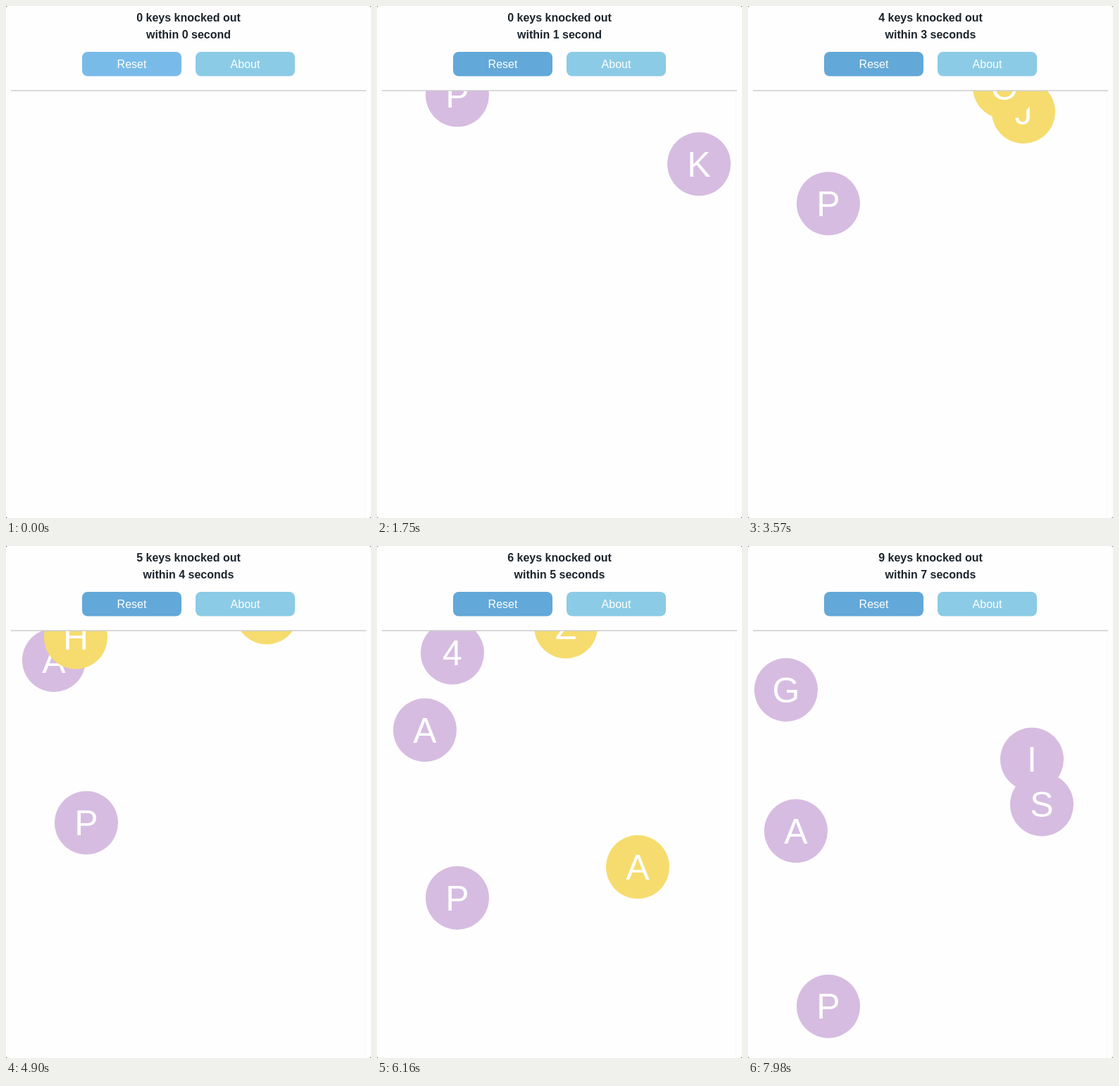
An HTML page that plays this animation: 518 by 726 pixels, repeating every 8 s.

```html
<!DOCTYPE html>
<html lang="en">
<head>
<meta charset="utf-8">
<title>Falling keys</title>
<style>
  html, body { margin: 0; width: 100%; height: 100%; overflow: hidden; background: #777; }
  svg { display: block; width: 518px; height: 726px; font: 16px "Liberation Sans", Arial, sans-serif; text-anchor: middle; }
  .score { font-weight: bold; fill: #1b242c; }
  .white, .ball text { fill: #fff; }
  .ball text { font-size: 50px; }
</style>
</head>
<body>
<svg viewBox="0 0 518 726">
  <defs><clipPath id="field"><rect y="120" width="518" height="606"/></clipPath></defs>
  <rect width="518" height="726" rx="3" fill="#fefefe"/>
  <path d="M509.5 128V726" stroke="#f8f8f8"/>
  <text class="score" id="keys" x="259" y="21.5"></text>
  <text class="score" id="secs" x="259" y="45.5"></text>
  <rect id="reset" x="108" y="65" width="141" height="34.5" rx="8"/>
  <rect x="269" y="65" width="141" height="34.5" rx="8" fill="#8bcbe6"/>
  <text class="white" x="178.5" y="88">Reset</text>
  <text class="white" x="339.5" y="88">About</text>
  <g id="balls" clip-path="url(#field)"></g>
  <path d="M7 120H511" stroke="#ccc" stroke-width="1.5"/>
</svg>
<script>
const LOOP = 8000, STEP = 70, SCORE_DELAY = 420, FIRST_TICK = 1190;
const PURPLE = '#d6bce1', YELLOW = '#f6dc6e';
const $ = id => document.getElementById(id);

// letter, colour, x, y at a known time, that time, speed in px/ms, time knocked out
const balls = [
  ['K', PURPLE, 457, 165.5, 1120, .093, 1960],
  ['M', YELLOW, 412, 197, 1120, .24, 1750],
  ['7', PURPLE, 234, 105, 2450, .15, 2730],
  ['P', PURPLE, 114, 185.5, 2450, .0845],
  ['X', YELLOW, 160, 223, 2450, .214, 2870],
  ['J', YELLOW, 391, 150, 3570, .25, 4200],
  ['O', YELLOW, 364, 115, 3570, .24, 4760],
  ['A', PURPLE, 68, 162, 4900, .0786],
  ['H', YELLOW, 99, 129.5, 4900, .2, 5880],
  ['A', YELLOW, 370, 94.5, 4900, .2862],
  ['4', PURPLE, 107, 151.5, 6160, .1, 6440],
  ['Z', YELLOW, 268, 114.5, 6160, .17, 6790],
  ['I', PURPLE, 403, 302.5, 7980, .16],
  ['S', PURPLE, 417, 366.5, 7980, .27],
  ['G', PURPLE, 54, 204, 7980, .13]
].map(([letter, color, x, y, at, speed, end = Infinity]) => {
  const node = document.createElementNS('http://www.w3.org/2000/svg', 'g');
  node.setAttribute('class', 'ball');
  node.innerHTML = `<circle r="45" fill="${color}"/><text y="17.5">${letter}</text>`;
  $('balls').append(node);
  return { node, x, y, at, speed, end };
});

const mix = (a, b, p) => `rgb(${a.map((v, i) => Math.round(v + (b[i] - v) * p))})`;

function draw(t) {
  for (const b of balls) {
    const y = b.y + (t - b.at) * b.speed;
    b.node.setAttribute('transform', `translate(${b.x} ${y.toFixed(2)})`);
    b.node.setAttribute('display', t < b.end ? 'inline' : 'none');
  }
  const score = balls.filter(b => t >= b.end + SCORE_DELAY).length;
  const seconds = Math.max(0, Math.floor((t - FIRST_TICK) / 1000) + 1);
  $('keys').textContent = `${score} ${score === 1 ? 'key' : 'keys'} knocked out`;
  $('secs').textContent = `within ${seconds} ${seconds > 1 ? 'seconds' : 'second'}`;
  const hover = Math.min(1, Math.max(0, (t - 70) / 280));
  $('reset').setAttribute('fill', mix([120, 187, 233], [98, 168, 216], hover));
}

const start = performance.now();
function tick() {
  const t = (performance.now() - start) % LOOP;
  draw(Math.floor(t / STEP) * STEP);
  requestAnimationFrame(tick);
}
tick();
</script>
</body>
</html>
```
